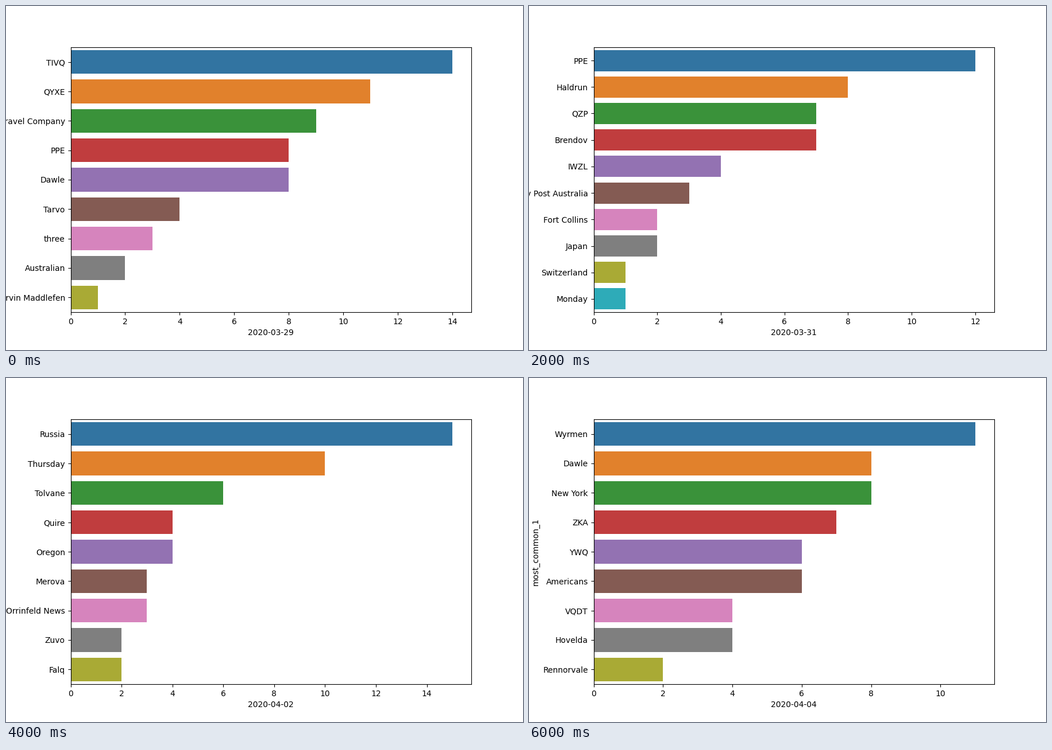
Animation of 900x600 px, one loop 7 s. Source, as a matplotlib script:

```python
import colorsys

import matplotlib.pyplot as plt
from matplotlib.animation import FuncAnimation
from matplotlib.colors import to_rgb

# For each day: mention count -> the words that reached it
DAYS = [
    {14: ["TIVQ"], 11: ["QYXE"], 9: ["Travel Company"],
     8: ["PPE", "Dawle"], 4: ["Tarvo"], 3: ["three"],
     2: ["Australian"], 1: ["Corvin Maddlefen"]},
    {26: ["Dorvel"], 7: ["Riddlevane", "one"], 6: ["Cuba"],
     3: ["Starkeep"], 2: ["Joss Tavrel", "Monday", "QVD News"],
     1: ["Nombri Jail authority"]},
    {12: ["PPE"], 8: ["Haldrun"], 7: ["QZP", "Brendov"],
     4: ["IWZL"], 3: ["Fenny Post Australia"],
     2: ["Fort Collins", "Japan"], 1: ["Switzerland", "Monday"]},
    {10: ["Torvendisk"], 8: ["Pelva", "Ulvo"], 3: ["XGL", "Zelmo"],
     2: ["Gnomes", "Wednesday", "Finn Orvald"], 1: ["Tarvo Lunn"]},
    {15: ["Russia"], 10: ["Thursday"], 6: ["Tolvane"],
     4: ["Quire", "Oregon"], 3: ["Merova", "Orrinfeld News"],
     2: ["Zuvo", "Falq"]},
    {13: ["Dawle"], 12: ["Bobbin Dorry"], 9: ["Jerk"],
     4: ["Central", "ACT"],
     1: ["Health Centres", "Shoppers", "New Zealand's", "Friday",
         "Congress"]},
    {11: ["Wyrmen"], 8: ["Dawle", "New York"], 7: ["ZKA"],
     6: ["YWQ", "Americans"], 4: ["VQDT", "Hovelda"],
     2: ["Rennorvale"]},
]


def muted(color, keep=0.75):
    """Reduce a colour's saturation."""
    h, l, s = colorsys.rgb_to_hls(*to_rgb(color))
    return colorsys.hls_to_rgb(h, l, s * keep)


def date_label(i):
    """Date i days after 29 March 2020."""
    months, day = divmod(28 + i, 31)
    return f"2020-{3 + months:02}-{day + 1:02}"


COLORS = [muted(f"C{k}") for k in range(10)]

plt.rcParams["font.family"] = "DejaVu Sans"
fig, ax = plt.subplots(figsize=(9, 6), dpi=100)


def draw(i):
    bars = [(word, count) for count, words in DAYS[i].items()
            for word in words]
    words, counts = zip(*bars)
    rows = range(len(bars))

    ax.clear()
    ax.barh(rows, counts, height=0.8, color=COLORS[:len(bars)])
    ax.set_yticks(rows, words)
    ax.set_ylim(len(bars) - 0.5, -0.5)
    ax.set_xlim(0, max(counts) * 1.05)
    ax.set_xlabel(date_label(i))
    # Sits left of the widest word, so long words push it off the stage
    ax.set_ylabel("most_common_1")


anim = FuncAnimation(fig, draw, frames=len(DAYS), interval=1000,
                     repeat=True, repeat_delay=0)
plt.show()
```
